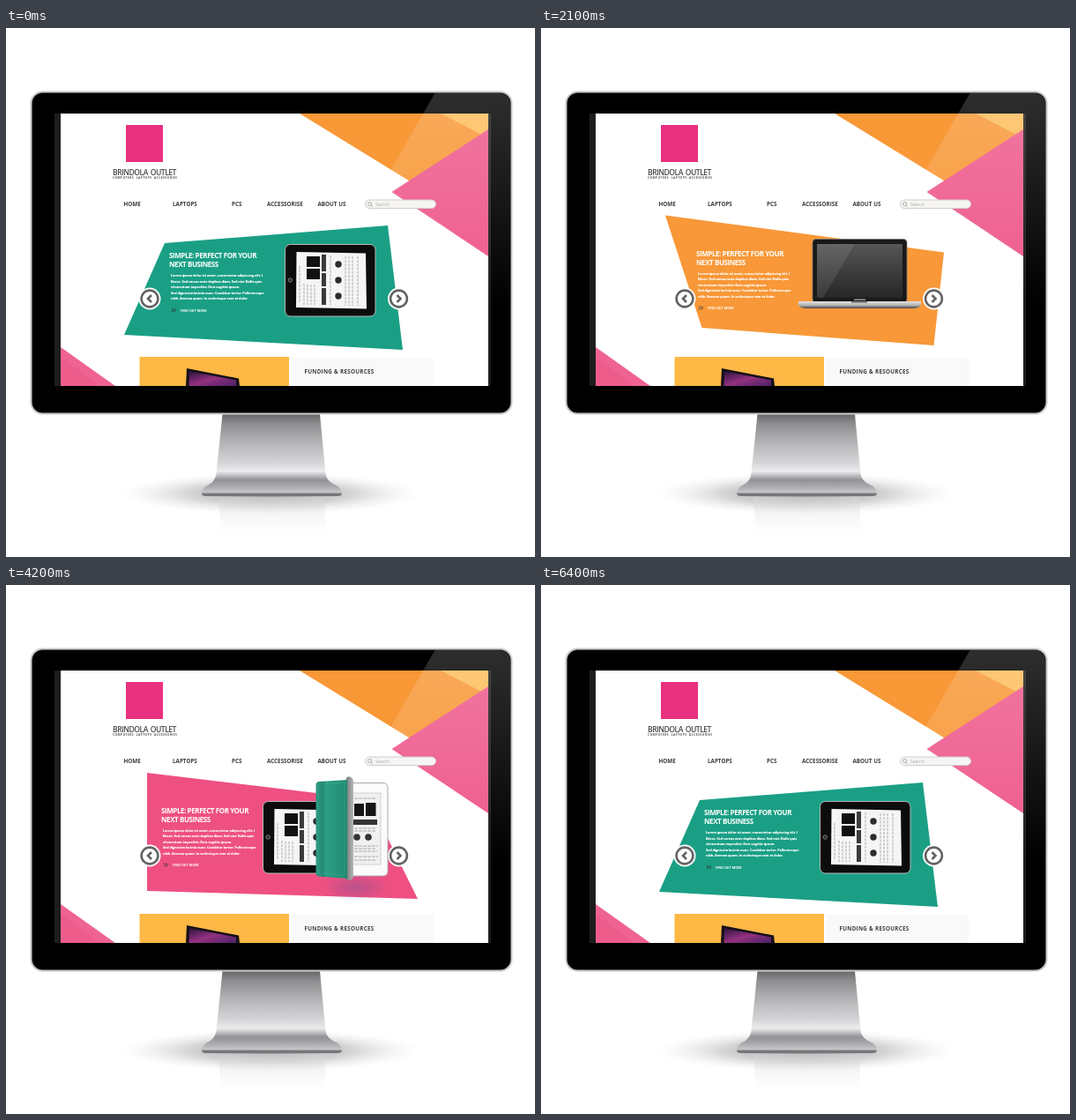
Recreate the animation shown at these times as an HTML page. Size 600 by 600 pixels, loop 6500 ms.

```html
<!DOCTYPE html>
<html lang="en">
<head>
<meta charset="utf-8">
<title>Store carousel on a monitor</title>
<style>
  html, body { margin: 0; width: 100%; height: 100%; overflow: hidden; background: #fff; }
  svg { display: block; width: 100%; height: 100%; }
  text { font-family: "Open Sans", "Noto Sans", sans-serif; }
  .nav { font-size: 6.3px; font-weight: 700; fill: #3b3b3b; }
  .head { font-size: 8px; font-weight: 700; letter-spacing: -.42px; }
  .body { font-family: Lato, "Open Sans", sans-serif; font-size: 3.8px; font-weight: 800; letter-spacing: -.13px; }
  .more { font-size: 3.7px; font-weight: 700; }
</style>
</head>
<body>
<svg viewBox="0 0 600 600">
  <defs>
    <linearGradient id="stand" x2="0" y2="1">
      <stop offset="0" stop-color="#68686a"/><stop offset=".12" stop-color="#8e8e90"/>
      <stop offset=".35" stop-color="#b4b4b6"/><stop offset=".6" stop-color="#d4d4d6"/>
      <stop offset=".71" stop-color="#ececee"/><stop offset=".82" stop-color="#929296"/>
      <stop offset=".9" stop-color="#a9a9ad"/><stop offset="1" stop-color="#d0d0d3"/>
    </linearGradient>
    <linearGradient id="reflection" x2="0" y2="1">
      <stop stop-color="#d4d4d4" stop-opacity=".6"/><stop offset="1" stop-color="#eee" stop-opacity="0"/>
    </linearGradient>
    <radialGradient id="floor">
      <stop stop-color="#666" stop-opacity=".75"/><stop offset=".55" stop-color="#999" stop-opacity=".4"/>
      <stop offset="1" stop-color="#ddd" stop-opacity="0"/>
    </radialGradient>
    <radialGradient id="soft">
      <stop stop-color="#65549a" stop-opacity=".38"/><stop offset="1" stop-color="#65549a" stop-opacity="0"/>
    </radialGradient>
    <linearGradient id="glare" x2="0" y2="1">
      <stop stop-color="#fff" stop-opacity=".18"/><stop offset=".75" stop-color="#fff" stop-opacity="0"/>
    </linearGradient>
    <linearGradient id="lid" x2="0" y2="1">
      <stop stop-color="#565656"/><stop offset="1" stop-color="#262626"/>
    </linearGradient>
    <linearGradient id="silver" x2="0" y2="1">
      <stop stop-color="#e2e2e2"/><stop offset=".55" stop-color="#b5b5b5"/><stop offset="1" stop-color="#444"/>
    </linearGradient>
    <linearGradient id="aurora" x2="1" y2="1">
      <stop stop-color="#2a1440"/><stop offset=".5" stop-color="#93317f"/><stop offset="1" stop-color="#4a2168"/>
    </linearGradient>
    <linearGradient id="cover">
      <stop stop-color="#2a9a81"/><stop offset=".27" stop-color="#1f866e"/>
      <stop offset=".3" stop-color="#2b9f86"/><stop offset="1" stop-color="#208a72"/>
    </linearGradient>
    <linearGradient id="edge">
      <stop stop-color="#777b7b"/><stop offset="1" stop-color="#b4b8b8"/>
    </linearGradient>
    <clipPath id="screen"><path d="M62 97H547V406H62Z"/></clipPath>
    <clipPath id="stage"><path d="M60 97H548V406H60Z"/></clipPath>
    <clipPath id="bezel"><rect x="30" y="74" width="542" height="362" rx="12"/></clipPath>
    <mask id="holes" maskUnits="userSpaceOnUse" x="0" y="90" width="600" height="330">
      <path fill="#fff" d="M0 90H600V420H0Z"/>
      <circle cx="163" cy="307" r="12.5"/><circle cx="445.5" cy="307" r="12.5"/>
    </mask>

    <g id="copy">
      <g fill="#fff">
        <text class="head" x="185" y="261">SIMPLE: PERFECT FOR YOUR</text>
        <text class="head" x="185" y="271">NEXT BUSINESS</text>
        <g class="body" id="lines"></g>
        <text class="more" x="198" y="321.5">FIND OUT MORE</text>
      </g>
      <path d="M188 318l2 2-2 2m2.6-4 2 2-2 2" fill="none" stroke="#333" stroke-width="1"/>
    </g>

    <g id="tablet">
      <rect x="316.5" y="245.5" width="102.5" height="81.5" rx="6" fill="#0c0c0c" stroke="#b9b9b9"/>
      <circle cx="322.3" cy="286" r="2.2" fill="#222" stroke="#999" stroke-width=".8"/>
      <path fill="#f5f5f5" d="M329.5 254 408 255.5 409 318.5 329 317Z"/>
      <path fill="#111" d="M341 259h15v12h-15zM341 273h15v12h-15z"/>
      <path fill="#3a3a3a" d="M358 257h5v19h-5zM358 278h5v15h-5zM358 295h5v19h-5z"/>
      <path stroke="#999" stroke-width=".8" stroke-dasharray="3 1.2"
        d="M333 270V312M338 290V314M342 291V314M346 291V314M350 291V314M368 258V314M385 259V315M389 259V315M393 259V315M399 259V315"/>
      <g fill="#2c2c2c"><circle cx="377" cy="268" r="3.7"/><circle cx="377" cy="286" r="3.7"/><circle cx="377" cy="304" r="3.7"/></g>
    </g>

    <g id="folio">
      <ellipse cx="397" cy="343" rx="38" ry="16" fill="url(#soft)"/>
      <use href="#tablet" x="-25"/>
      <rect x="384" y="224.5" width="49" height="105.5" rx="5" fill="#fbfbfb" stroke="#aaa"/>
      <path fill="#f0f0f0" stroke="#bbb" stroke-width=".6" d="M390 236H425V317H390Z"/>
      <path fill="#151515" d="M395 248h11v14h-11zM408 247h11.5v15H408z"/>
      <path fill="#333" d="M392 266h29v6h-29z"/>
      <path stroke="#999" stroke-width=".8" stroke-dasharray="4 1"
        d="M395 242H420M395 276H420M395 279H420M395 296H422M395 299H420M395 302H421M395 308H422M395 312H420"/>
      <circle cx="398" cy="286" r="3.8" fill="#333"/><circle cx="411" cy="286" r="3.8" fill="#333"/>
      <path fill="url(#edge)" d="M386 219q2-3 5-1 3 1 3 5V329q0 5-4 6l-4-1Z"/>
      <path fill="url(#cover)" d="M351.5 227q0-4 4-4L387 221V333L355 330.5q-3.500 0-3.500-4Z"/>
      <path fill="none" stroke="#55b39e" stroke-width=".6" stroke-dasharray="1.5 1" d="M354 226 384 224V329L354 327ZM361 225V328"/>
    </g>

    <g id="laptop" transform="translate(-44)">
      <rect x="352" y="239.5" width="107" height="72" rx="4" fill="#191919" stroke="#777" stroke-width=".8"/>
      <path fill="url(#lid)" d="M357 245H454V306H357Z"/>
      <path fill="#fff" opacity=".09" d="M357 245H400L364 306H357Z"/>
      <path fill="#ddd" d="M399 307.6h13v1h-13z"/>
      <path fill="url(#silver)" d="M336 310H475V314q-2 4-9 4H345q-7 0-9-4Z"/>
      <path fill="#888" d="M396 310h18v2h-18z"/>
    </g>
  </defs>

  <!-- monitor -->
  <ellipse cx="300" cy="528" rx="172" ry="24" fill="url(#floor)"/>
  <path fill="url(#reflection)" d="M241 532H362V575H244Z"/>
  <path fill="url(#stand)" d="M245.5 438H356L362.5 506Q364 514 373 518 381 521 381 529H222Q222 521 230 518 237 514 238.500 506Z"/>
  <path fill="#77777b" d="M222 527.5H381q0 3.500-5 3.500H227q-5 0-5-3.500Z"/>
  <rect x="28.5" y="72.5" width="545" height="365" rx="13" fill="#000" stroke="#c5cbc8" stroke-width="2"/>
  <path fill="#1d1d1d" d="M55 97H62V406H55ZM547 97H550V406H547Z"/>

  <!-- web page -->
  <g clip-path="url(#screen)">
    <path fill="#fff" d="M62 97H547V406H62Z"/>
    <path fill="#f89837" d="M333 97H547V118L460 175Z"/>
    <path fill="#fdbd5b" d="M493 97H547V125Z"/>
    <path fill="#ee5a8d" d="M437.5 186 547 115V259Z"/>
    <path fill="#ef6391" d="M62 362 124 406H62Z"/>
    <path fill="#ee5c8b" d="M62 373 106 406H62Z"/>
    <rect x="136" y="110" width="42" height="42" fill="#e8317f"/>
    <text x="121" y="166.5" font-size="8.6" font-weight="600" letter-spacing="-.5" word-spacing="1" fill="#484848">BRINDOLA OUTLET</text>
    <text x="121" y="170.5" font-size="3.3" font-weight="700" letter-spacing=".45" fill="#555" xml:space="preserve">COMPUTERS  LAPTOPS  ACCESSORIES</text>
    <g class="nav">
      <text x="133.5" y="202">HOME</text><text x="189" y="202">LAPTOPS</text><text x="256" y="202">PCS</text>
      <text x="296" y="202">ACCESSORISE</text><text x="353.5" y="202">ABOUT US</text>
      <text x="338.5" y="392" letter-spacing=".27">FUNDING &amp; RESOURCES</text>
    </g>
    <path fill="#fdb845" d="M151.5 373H321V406H151.5Z"/>
    <path fill="#161019" d="M205 386 264 397.5 265 406H204Z"/>
    <path fill="url(#aurora)" d="M208 389.5 261 399.5V406H207.5Z"/>
  </g>
  <path fill="#888" opacity=".05" d="M324 374H485V406H324Z"/>
  <path clip-path="url(#bezel)" fill="url(#glare)" d="M487 73H573V400H299Z"/>
  <rect x="407.5" y="195" width="80" height="9.5" rx="4.7" fill="#f6f5f3" stroke="#cfcdcb"/>
  <path fill="none" stroke="#999" stroke-width=".8" d="M414.3 201.2 416 203M410.6 199.5a2 2 0 1 1 4 0a2 2 0 1 1-4 0"/>
  <text x="419" y="201.6" font-size="5" fill="#aaa">Search</text>
  <g fill="none" stroke="#636363" stroke-width="2.6">
    <circle cx="163" cy="307" r="9.4"/><path d="M165 303 161 307 165 311"/>
    <circle cx="445.5" cy="307" r="9.4"/><path d="M443.5 303 447.5 307 443.5 311"/>
  </g>
  <g id="slides" clip-path="url(#stage)"></g>
</svg>
<script>
const LOOP = 6500, FRAME = 100, STEPS = 6;

// enter / leave: times in ms; panel and device: pixels per step [entering, leaving]
const slides = [
  { enter: -600, leave: 1000, color: "#1a9f85", shape: "180,244 433,224 450,365 134,348",
    art: "tablet", copy: [0, 0], panel: [68, -67.7], device: [-60, 40] },
  { enter: 1600, leave: 3100, color: "#f89838", shape: "141,212.5 457,254.5 445.5,360 182.5,340",
    art: "laptop", copy: [-9, -2.5], panel: [68.1, -67.5], device: [-61.8, 44] },
  { enter: 3700, leave: 5200, color: "#ee5082", shape: "160,213 411,243 467,356 160,347",
    art: "folio", copy: [-9, -2.5], panel: [66.4, -67.7], device: [-65.2, 44.2] },
];

const copyLines = [
  "Lorem ipsum dolor sit amet, consectetur adipiscing elit. I",
  "libero. Sed cursus ante dapibus diam. Sed nisi. Nulla quis",
  "elementum imperdiet. Duis sagittis ipsum.",
  "Sed dignissim lacinia nunc. Curabitur tortor. Pellentesque",
  "nibh. Aenean quam. In scelerisque sem at dolor.",
];

function add(parent, tag, attributes) {
  const node = document.createElementNS("http://www.w3.org/2000/svg", tag);
  for (const [name, value] of Object.entries(attributes)) node.setAttribute(name, value);
  return parent.appendChild(node);
}

copyLines.forEach((line, i) => {
  add(document.getElementById("lines"), "text", { x: 187, y: 282.3 + 6.5 * i }).textContent = line;
});

for (const slide of slides) {
  slide.root = add(document.getElementById("slides"), "g", {});
  slide.panelNode = add(slide.root, "polygon", { points: slide.shape, fill: slide.color, mask: "url(#holes)" });
  slide.copyNode = add(slide.root, "use", { href: "#copy", x: slide.copy[0], y: slide.copy[1] });
  slide.deviceNode = add(slide.root, "use", { href: "#" + slide.art });
}

function stepsSince(time, start) {
  return Math.max(0, Math.min(STEPS, Math.floor((time - start) / FRAME) + 1));
}

function draw(now) {
  const time = now % LOOP;
  for (const slide of slides) {
    const local = slide.enter < 0 && time >= LOOP + slide.enter ? time - LOOP : time;
    const entered = stepsSince(local, slide.enter);
    const left = stepsSince(local, slide.leave);
    const move = ([entering, leaving]) => `translate(${(STEPS - entered) * entering + left * leaving})`;
    slide.root.style.display = entered > left ? "" : "none";
    slide.panelNode.setAttribute("transform", move(slide.panel));
    slide.deviceNode.setAttribute("transform", move(slide.device));
    slide.copyNode.setAttribute("opacity", (entered - left) / STEPS);
  }
}

const start = performance.now();
function tick() {
  draw(performance.now() - start);
  requestAnimationFrame(tick);
}
tick();
</script>
</body>
</html>
```
